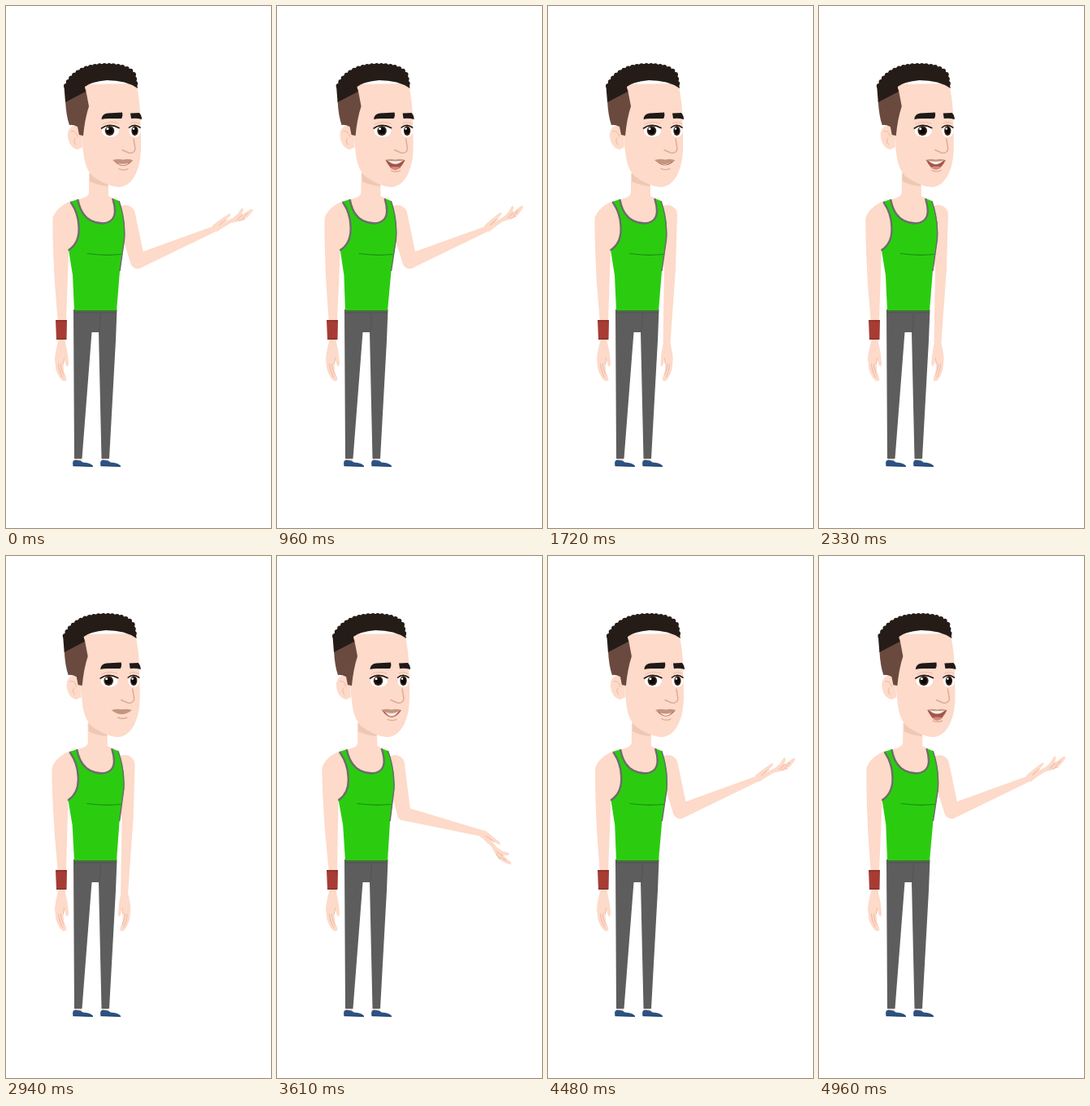
An HTML page for the animation above (5020 ms loop, 326 px wide and 640 px high).

```html
<!DOCTYPE html>
<html lang="en">
<head>
<meta charset="utf-8">
<title>Presenter</title>
<style>
  html, body { margin: 0; width: 100%; height: 100%; overflow: hidden; background: #fff; }
  svg { display: block; width: 326px; height: 640px; }
  .skin { fill: #fddac9; }
  .fold { fill: none; stroke: #efb9a3; stroke-width: 1; stroke-linecap: round; }
  .trim { fill: none; stroke: #6c6d6b; stroke-width: 2.4; stroke-linecap: round; }
  .ink { fill: #1f1a18; }
  .lid { fill: none; stroke: #1f1a18; stroke-width: 1.6; stroke-linecap: round; }
</style>
</head>
<body>
<svg viewBox="0 0 326 640">
  <defs>
    <g id="hang">
      <path class="skin" d="M-4 0Q-8 14-8.500 23L-7 36Q-3 47 2 50L6 49Q6 45 3 40L2 30 3 22Q5 31 6.500 32 8.500 32 8.500 27L7 14 4 0Z"/>
      <path class="fold" d="M-4 29Q-3 39 1 45M3 22L2 29M-1 29Q-1 37 3 42"/>
    </g>
    <g id="shoe">
      <path d="M.5 7.500Q-1 1 3 .5L10 1.500Q12 4 17 4 24 5 25 8.500L9 8Z" fill="#2b5386"/>
      <path d="M.5 7.500L9 7.800 25 8.300" fill="none" stroke="#213f66" stroke-width="1.300"/>
    </g>
  </defs>

  <g id="rightArm">
    <path id="upper" class="skin"/>
    <path id="fore" class="skin"/>
    <g id="openHand">
      <path class="skin" d="M-3-4L5-10 17-18Q21-19 19-16L11-8 22-13 28-18 32-24Q35-27 35-23L33-17 38-20 44-24Q48-25 46-21L40-14 30-9 20-7 8 0 2 4Z"/>
      <path class="fold" d="M5-4Q10-9 14-11M27-11L34-17M30-10L37-12M34-13L40-19"/>
    </g>
    <use id="restHand" href="#hang"/>
  </g>

  <g id="legs">
    <path class="skin" d="M85 552h8v5h-8zM118 552h8v5h-8z"/>
    <path d="M83 372H136.500L135 410 127 555H117.500L114 400H105.500L93.500 555H84Z" fill="#5d5d5d"/>
    <path d="M116 377Q117 390 114.500 399M83.500 376H136" fill="none" stroke="#525252"/>
    <use href="#shoe" x="82" y="556"/>
    <use href="#shoe" x="116" y="556"/>
  </g>

  <g id="leftArm">
    <path class="skin" d="M80 239Q62 246 57.500 260 57 285 60 340L64 390 65 412H72L74 386 77 300 95 280 92 245Z"/>
  </g>
  <use href="#hang" x="68.500" y="410"/>
  <path d="M61 385H75L74.500 409H62Z" fill="#a73c35"/>
  <path d="M61.500 385.800H74.500M62 408.300H74" stroke="#852d29" stroke-width="1.300"/>

  <g id="torso">
    <path class="skin" d="M102 205H126V233L139 239 146 258 132 275H92L78 242 88 237Q102 235 102 228Z"/>
    <path d="M79 240L88.500 237Q94 266 119 267 140 266 131.500 236L139 239Q148 262 146 286L140 325 136 374H84L82 330 77 299Q92 290 90 270 88 252 79 240Z" fill="#2bcc10"/>
    <path class="trim" d="M88.500 238Q94 266 119 266.500 140 265 131.500 237M80 241Q89 254 89.500 270 91 290 77.500 299"/>
    <path d="M139 239Q147 262 145.500 286L140 325" fill="none" stroke="#6c6d6b" stroke-width="1.500"/>
    <path d="M100 303.500Q120 306.500 142 304.500" fill="none" stroke="#1d8a12" stroke-width="1.200"/>
    <path d="M84 373.500H136" stroke="#35831f" stroke-width="1.200"/>
  </g>

  <g id="head">
    <path d="M103 204L127 214 125 221Q113 220 103 215Z" fill="#efc8b4"/>
    <path class="skin" d="M92 150Q88 145 82 147 75 151 76 160 78 174 88 176L94 173Z"/>
    <path class="fold" d="M80 154Q85 151 88 160M85 162Q82 166 86 170"/>
    <path class="skin" d="M96 96L160 95Q165 115 165.500 140L166 165Q167 190 160 205 152 222 138 222 124 221 107 209 97 200 95 178L92 150Z"/>
    <path d="M73 116L98 102 102 123Q97 138 95 159L90 158 88 148Q82 145 78 146 74 135 73 116Z" fill="#6a4a3f"/>
    <path d="M73 118L71.500 99Q83 73 118 71 150 70 159 84L162 101Q148 91 124 91 104 93 97 99L98 105Z" fill="#261c17"/>
    <path d="M74 98Q85 75 118 73 150 72 157 84L159.500 97" fill="none" stroke="#261c17" stroke-width="6" stroke-linecap="round" stroke-dasharray="0 5.600"/>

    <path class="ink" d="M117.500 139Q118 132 125 131.500L143 130.500Q144 135 142 138L126 138Q121 138 117.500 139ZM153 131.500L164 131Q167 134 167 139 161 137 154 138Z"/>
    <ellipse cx="128.500" cy="153.500" rx="10.500" ry="7.300" fill="#fff"/>
    <ellipse cx="158.500" cy="153.500" rx="7" ry="7.300" fill="#fff"/>
    <g fill="#3a251b">
      <ellipse cx="127.500" cy="153" rx="5.800" ry="6"/>
      <ellipse cx="158.500" cy="153" rx="4.200" ry="6"/>
    </g>
    <g fill="#0c0908">
      <circle cx="127.500" cy="153" r="4"/>
      <ellipse cx="158.500" cy="153" rx="3" ry="4"/>
    </g>
    <circle cx="125" cy="150.500" r="1.500" fill="#fff"/>
    <circle cx="157" cy="150.500" r="1.200" fill="#fff"/>
    <path class="lid" d="M117.500 150Q127 143 139 149.500M151.500 149Q158 143.500 165 149"/>
    <path class="fold" d="M119 145Q128 140 138 144M153 144Q158 141 164 144"/>
    <path d="M157 163L159 175Q158 181 151 180L143 176.500" fill="none" stroke="#dfaa93" stroke-width="1.500" stroke-linecap="round"/>

    <path id="cavity" fill="#a65449"/>
    <path id="tongue" fill="#d58a7d"/>
    <path id="teeth" fill="#f3eeea"/>
    <path id="lip" fill="#c4947f"/>
    <path id="chin" fill="none" stroke="#e2ab96" stroke-width="1.400" stroke-linecap="round"/>
  </g>
</svg>
<script>
const LOOP = 5020, TICKS = 74, WAIST = 374, WRIST = 385;

// Pairs of tick and value
const sway = [[0, 0], [8, .4], [14, 1.3], [18, 1], [24, 0], [32, 0], [43, -1.1], [49, -2], [53, -2.5], [55, -1.5], [58, 0], [65, .7], [74, 1.2]];
const lift = [[0, 1], [14, 1], [15, .85], [16, .5], [17, .2], [18, .04], [19, 0], [50, 0], [51, .12], [52, .38], [53, .68], [54, .88], [55, .98], [56, 1], [74, 1]];
const flick = [[0, 0], [6, -2], [14, -5], [19, 0], [54, 0], [58, -3], [66, -1], [73, -4], [74, -4]];
const talk = [[0, .42], [3, .8], [5, .3], [8, .9], [11, .2], [14, .95], [17, .5], [20, .85], [23, .2], [25, .35],
  [28, .8], [31, .15], [34, .9], [37, .4], [40, .7], [43, 0], [46, .5], [49, .9], [51, .3], [53, .6],
  [56, .2], [58, .7], [61, .3], [64, .9], [67, .25], [70, .6], [73, 1], [74, 1]];

const $ = id => document.getElementById(id);
const set = (id, name, value) => $(id).setAttribute(name, value);
const mix = (a, b, p) => a + (b - a) * p;

function sample(keys, t) {
  let i = 1;
  while (i < keys.length - 1 && keys[i][0] < t) i++;
  const [t0, a] = keys[i - 1], [t1, b] = keys[i];
  return mix(a, b, Math.min(1, Math.max(0, (t - t0) / (t1 - t0))));
}

// Tapered limb with round ends
function limb(x0, y0, r0, x1, y1, r1) {
  const len = Math.hypot(x1 - x0, y1 - y0);
  const nx = (y0 - y1) / len, ny = (x1 - x0) / len;
  const at = (x, y, r) => `${x + nx * r} ${y + ny * r}`;
  return `M${at(x0, y0, r0)}A${r0} ${r0} 0 0 1 ${at(x0, y0, -r0)}` +
    `L${at(x1, y1, -r1)}A${r1} ${r1} 0 0 1 ${at(x1, y1, r1)}Z`;
}

function lean(id, d, base) {
  const k = -d / (base - 240);
  set(id, "transform", `matrix(1 0 ${k} 1 ${-k * base} 0)`);
}

function drawArm(tick, d) {
  const p = sample(lift, tick), late = sample(lift, tick - 1);
  const ex = mix(150, 162, p), ey = mix(322, 313, p);
  const angle = mix(92.5, -22.8, p) * Math.PI / 180, len = mix(90, 103, p);
  const wx = ex + len * Math.cos(angle), wy = ey + len * Math.sin(angle);
  const elbow = mix(7, 9, p);
  set("upper", "d", limb(147, 256, 12, ex, ey, elbow));
  set("fore", "d", limb(ex, ey, elbow, wx, wy, mix(4.5, 3.5, p)));
  set("rightArm", "transform", `translate(${d * mix(.4, 1, p)} 0)`);

  // The hand trails the forearm by one tick
  const hand = mix(92.5, -26, late) + sample(flick, tick);
  const open = late > .2 || p > .3;
  set("openHand", "visibility", open ? "visible" : "hidden");
  set("restHand", "visibility", open ? "hidden" : "visible");
  set("openHand", "transform", `translate(${wx} ${wy}) rotate(${hand + 26})`);
  set("restHand", "transform", `translate(${wx} ${wy - 2}) rotate(${hand - 92.5}) scale(-.9 1)`);
}

function drawMouth(open) {
  const bottom = 192 + open * 9.5;
  const upper = 194 - 4 * Math.max(0, (open - .4) / .6);
  const bowl = y => `Q144 ${2 * y - 189} 156 189`;
  set("cavity", "d", `M132 189${bowl(bottom)}Z`);
  set("tongue", "d", `M137 ${bottom - 3}Q144 ${bottom - 5} 151 ${bottom - 3}Q144 ${bottom + 2.5} 137 ${bottom - 3}Z`);
  set("teeth", "d", `M134 189${bowl(Math.min(bottom - .8, upper + 3.5)).replace("156", "154")}Z`);
  set("lip", "d", `M131 189Q138 187 144 188.500 150 187 156 189Q144 ${2 * upper - 189} 131 189Z`);
  const y = 199 + open * 4;
  set("chin", "d", `M139 ${y - 1}Q145 ${y + 1.5} 150 ${y - 1}`);
}

function draw(tick) {
  const d = sample(sway, tick);
  lean("torso", d, WAIST);
  lean("leftArm", d, WRIST);
  set("head", "transform", `translate(${d * 1.2} 0)`);
  drawArm(tick, d);
  drawMouth(sample(talk, tick));
}

function run() {
  draw(Math.floor(performance.now() % LOOP / LOOP * TICKS));
  requestAnimationFrame(run);
}
run();
</script>
</body>
</html>
```
